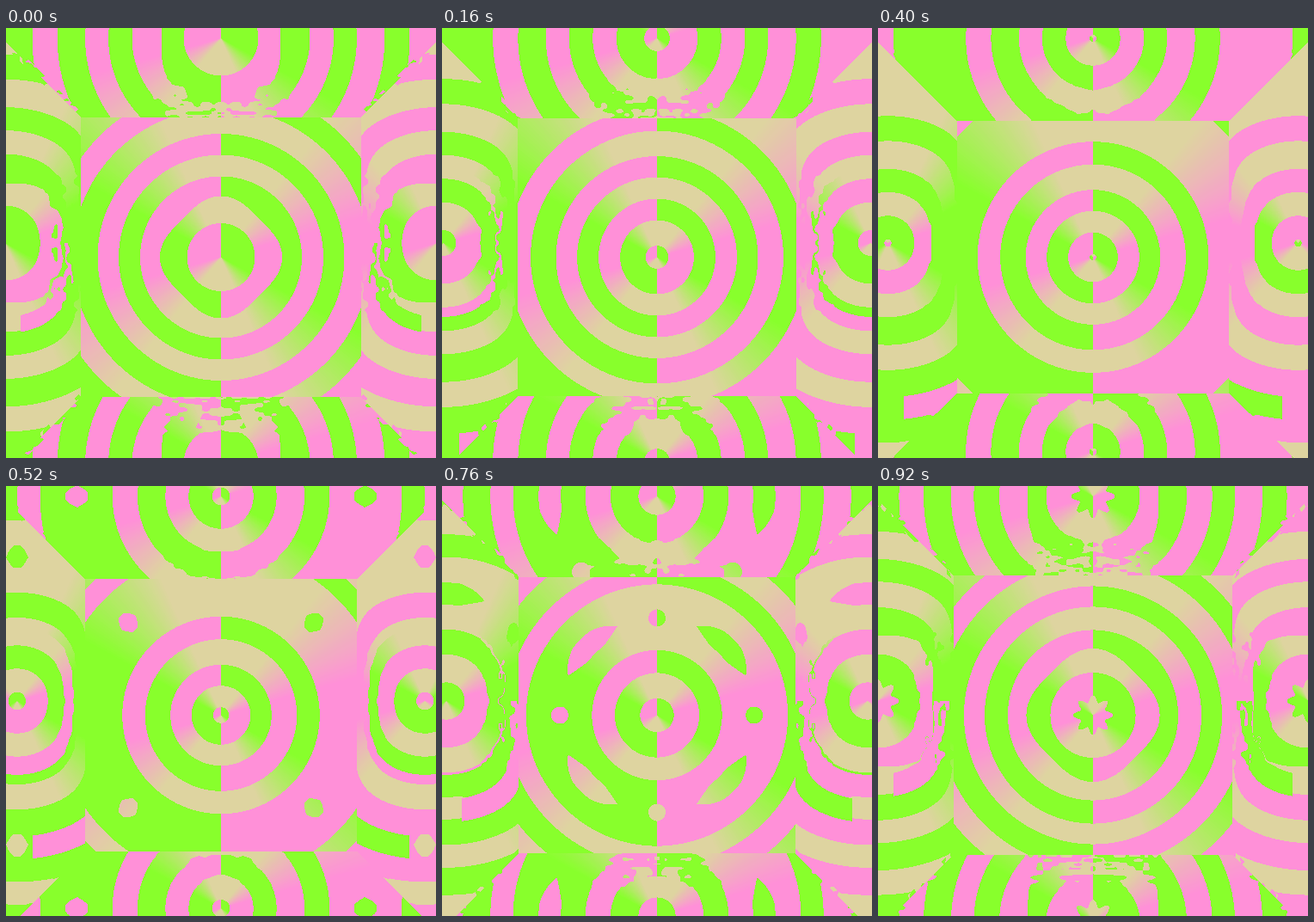
Write an HTML page with a canvas that moves like this. It is 500x500 px and loops after 0.96 s.

```html
<!DOCTYPE html>
<html lang="en">
<head>
<meta charset="utf-8">
<title>Ring room</title>
<style>
html, body { margin: 0; width: 100%; height: 100%; overflow: hidden; background: #88ff2a; }
canvas { display: block; width: 500px; height: 500px; }
</style>
</head>
<body>
<canvas id="stage" width="500" height="500"></canvas>
<script>
const SIZE = 500, LOOP = 960, STEP = 40, SPEED = 0.163;
const CX = 250, CY = 266.5, TILE_SCALE = 1.1;
const GREEN = [136, 255, 44], PINK = [255, 144, 216], BEIGE = [222, 212, 160];
// Ring edges at time zero; tones alternate from one ring to the next.
const EDGES = [39.5, 69, 94, 119, 143.5, 173, 199.5, 225.5, 249, 276, 300, 329, 355];
const BUDDING = 8, BUD_RADIUS = 237, PERIOD = SPEED * LOOP;

const ctx = document.getElementById('stage').getContext('2d');
const clamp = v => Math.max(0, Math.min(1, v));
const pack = c => (255 << 24 | c[2] << 16 | c[1] << 8 | c[0]) >>> 0;
const mix = (a, b, k) => a.map((v, i) => Math.round(v + (b[i] - v) * k));

// Colour by degrees from straight up: green, beige, pink, with a hard seam below.
const wheel = new Uint32Array(360);
for (let i = 0; i < 360; i++) {
  const deg = i - 180;
  wheel[i] = pack(deg < 0
    ? mix(BEIGE, GREEN, clamp((-deg - 24) / 38))
    : mix(BEIGE, PINK, clamp((deg - 38) / 36)));
}

function hash(x, y) {
  let n = Math.imul(x, 374761393) + Math.imul(y, 668265263);
  n = Math.imul(n ^ (n >>> 13), 1274126177);
  return ((n ^ (n >>> 16)) >>> 0) / 4294967296;
}

function noise(x, y) {
  const ix = Math.floor(x), iy = Math.floor(y);
  let u = x - ix, v = y - iy;
  u *= u * (3 - 2 * u);
  v *= v * (3 - 2 * v);
  const top = hash(ix, iy) * (1 - u) + hash(ix + 1, iy) * u;
  const low = hash(ix, iy + 1) * (1 - u) + hash(ix + 1, iy + 1) * u;
  return top * (1 - v) + low * v;
}

// The new ring buds on four diagonals and four axes before it closes.
function budded(r, R, deg, turn, t) {
  if (t >= 880) return true;
  if (t < 520) return false;
  const q = Math.abs((((deg + turn) % 90) + 90) % 90 - 45);
  const half = t < 760 ? 10 + (t - 600) * 0.07 : 21 + (t - 760) * 0.19;
  if (q < half && Math.abs(R - BUD_RADIUS) < 13 * (1 - (q / half) ** 2)) return true;
  return Math.hypot(R - BUD_RADIUS, r * (45 - q) * Math.PI / 180) < (t - 680) / 8;
}

// side: -1 left wall, 1 right wall, 0 elsewhere.
function tone(dx, dy, r, turn, side, t) {
  let deg = Math.atan2(dx, -dy) * 180 / Math.PI;
  const R = r + SPEED * t;
  const closing = t >= 880 || t <= 40;
  let ring = 0;
  for (; ring < EDGES.length; ring++) {
    let edge = EDGES[ring];
    if (closing && ring === (t > 480 ? 7 : 1)) {
      edge += 4 * Math.cos((deg + turn) * Math.PI / 45) - 2;
    }
    if (t >= 900 && ring === 5) edge += 4 * Math.cos(deg * Math.PI / 22.5) - 4;
    if (R < edge) break;
  }
  let flipped = ring % 2 === 0;
  if (ring === BUDDING) flipped = budded(r, R, deg, turn, t);
  if (side) {
    // Far rings take the wall's own colour, except for a low crescent.
    let far = r > 78;
    const band = Math.abs((R - 240 + PERIOD * 2.5) % PERIOD - PERIOD / 2);
    if (far && dy > 0 && -side * dx > 18 && band < 12) far = flipped = false;
    deg = Math.abs(deg) * (far && !flipped ? side : -side);
  }
  return wheel[(Math.floor(deg + (flipped ? 360 : 180))) % 360];
}

function render(t) {
  const image = ctx.createImageData(SIZE, SIZE);
  const out = new Uint32Array(image.data.buffer);
  const wave = Math.cos((t - 20) / LOOP * 2 * Math.PI);
  const half = 160.3 + 2.3 * wave;
  const rough = 0.1 + 0.45 * (1 + wave);
  const sideX = 6 - 7 * wave, lowY = 499 + 8 * wave;

  for (let y = 0, i = 0; y < SIZE; y++) {
    for (let x = 0; x < SIZE; x++, i++) {
      let dx = x + 0.5 - CX, dy = y + 0.5 - CY;
      const ax = Math.abs(dx), ay = Math.abs(dy);
      const depth = Math.max(ax, ay) - half;
      if (depth < 0) {
        out[i] = tone(dx, dy, Math.hypot(dx, dy), 0, 0, t);
        continue;
      }
      let r, across, side = 0;
      if (ax > ay) {
        side = Math.sign(dx);
        dx = x + 0.5 - (side < 0 ? sideX : SIZE - sideX);
        dy = y + 0.5 - 250;
        across = Math.abs(dy);
        const squeeze = 0.45 * Math.abs(dx / 75) ** 3 * Math.exp(-((dy / 90) ** 2));
        r = Math.hypot(dx * (1 + squeeze), dy);
      } else {
        dy = y + 0.5 - (dy < 0 ? 12 : lowY);
        across = ax;
        r = Math.hypot(dx, dy);
      }
      r /= TILE_SCALE;
      // Broken reflections beside the walls and along the corner seams.
      let warp = 0;
      if (depth < 48 && across < 80) {
        warp = 80 * rough * (1 - depth / 48) * Math.sqrt(1 - across / 80);
      } else if (Math.abs(ax - ay) < 6) {
        warp = 26 * rough;
      }
      if (warp) r = Math.abs(r + warp * (noise(across / 9 + t / 130, depth / 5 - t / 90) - 0.5));
      out[i] = tone(dx, dy, r, 45, side, t);
    }
  }
  return image;
}

const cache = [];
let shown = -1;
const start = performance.now();

function draw(now) {
  const step = Math.floor((Math.max(0, now - start) % LOOP) / STEP);
  if (step !== shown) {
    cache[step] = cache[step] || render(step * STEP);
    ctx.putImageData(cache[step], 0, 0);
    shown = step;
  }
  requestAnimationFrame(draw);
}

draw(start);
</script>
</body>
</html>
```
